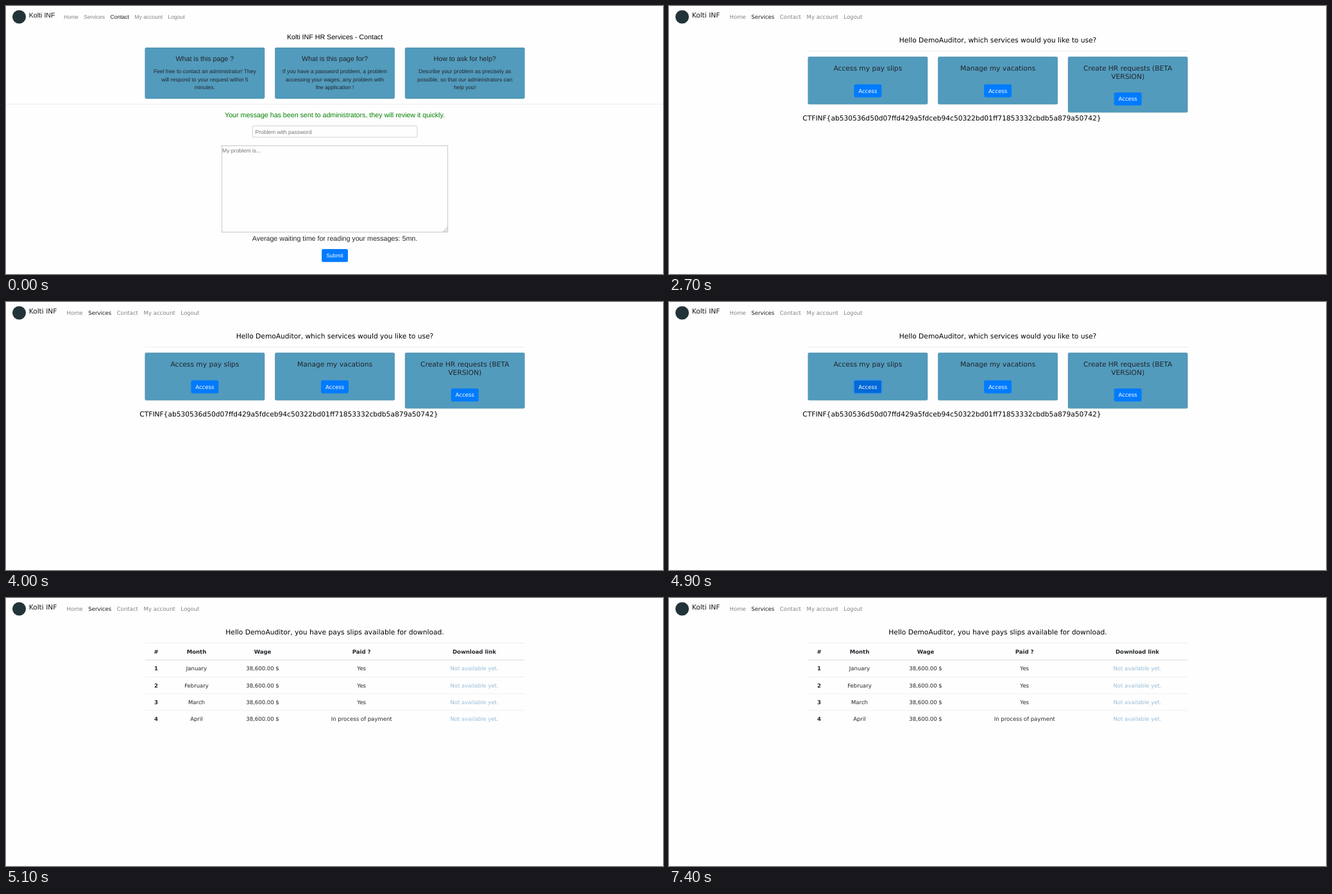
These frames come from a looping animation (1024x419 px, 8000 ms). An HTML page:

```html
<!DOCTYPE html>
<html lang="en">
<head>
<meta charset="utf-8">
<title>HR services</title>
<style>
  html, body { margin: 0; width: 100%; height: 100%; overflow: hidden; background: #fefefe; }
  svg { display: block; width: 100vw; height: 100vh; text-rendering: geometricPrecision; }
  .sans { font-family: "Liberation Sans", Arial, sans-serif; }
  .wide { font-family: "DejaVu Sans", sans-serif; }
</style>
</head>
<body>
<svg id="stage" viewBox="0 0 1024 419"></svg>
<script>
const LOOP = 8000;
const BIG = 10.667, SMALL = 8.533, HAIR = 0.533;
const MID = 512.5, PITCH = 202.67, CARD_W = 186.67;
const LEFT = MID - 296, RIGHT = MID + 296;
const INK = '#212529', BLUE = '#007bff', BLUE_HOVER = '#0069d9', BLUE_DOWN = '#0062cc';
const GREY = '#808080', HOVER = '#4d4d4d', ACTIVE = '#1a1a1a';
const BRAND = 'Kolti INF', USER = 'DemoAuditor';
const LINKS = ['Home', 'Services', 'Contact', 'My account', 'Logout'];

const stage = document.getElementById('stage');

function add(parent, tag, attrs, text) {
  const el = document.createElementNS('http://www.w3.org/2000/svg', tag);
  for (const key in attrs) el.setAttribute(key, attrs[key]);
  if (text) el.textContent = text;
  parent.appendChild(el);
  return el;
}

function label(parent, text, x, y, size = SMALL, fill = INK, more = {}) {
  return add(parent, 'text', { x, y, 'font-size': size, fill, ...more }, text);
}

function centred(parent, text, x, y, size, fill, more = {}) {
  return label(parent, text, x, y, size, fill, { 'text-anchor': 'middle', ...more });
}

function box(parent, x, y, width, height, fill, stroke = 'none', rx = 2.13) {
  return add(parent, 'rect', { x, y, width, height, fill, stroke, rx, 'stroke-width': HAIR });
}

function rule(parent, x1, x2, y, stroke = '#dee2e6', width = HAIR) {
  return add(parent, 'line', { x1, x2, y1: y, y2: y, stroke, 'stroke-width': width });
}

function page(font, linkXs, active) {
  const g = add(stage, 'g', { class: font });
  add(g, 'circle', { cx: 20.5, cy: 17, r: 10.5, fill: '#22333a' });
  label(g, BRAND, 35.7, 18.4, BIG, ACTIVE);
  const links = LINKS.map((name, i) =>
    label(g, name, linkXs[i], 20.2, SMALL, name === active ? ACTIVE : GREY));
  return { g, links };
}

function card(parent, i, y, height, titles) {
  const x = MID + (i - 1) * PITCH, left = x - CARD_W / 2, inset = HAIR / 2;
  box(parent, left, y, CARD_W, height, '#529bbd');
  box(parent, left + inset, y + inset, CARD_W - HAIR, height - HAIR, 'none', 'rgba(0,0,0,.125)', 1.9);
  titles.forEach((t, n) => centred(parent, t, x, y + 21.4 + n * 12.8, BIG));
  return x;
}

function button(parent, text, x, y, width) {
  const face = box(parent, x - width / 2, y, width, 20.27, BLUE);
  centred(parent, text, x, y + 13.2, SMALL, '#fff');
  return face;
}

function buildContact() {
  const p = page('sans', [90, 121.3, 162.6, 200.5, 252.6], 'Contact'), g = p.g;
  centred(g, BRAND + ' HR Services - Contact', MID, 51.8, BIG, '#000');
  const cards = [
    ['What is this page ?', 'Feel free to contact an administrator! They',
      'will respond to your request within 5', 'minutes.'],
    ['What is this page for?', 'If you have a password problem, a problem',
      'accessing your wages, any problem with', 'the application !'],
    ['How to ask for help?', 'Describe your problem as precisely as',
      'possible, so that our administrators can', 'help you!']
  ];
  cards.forEach(([title, ...lines], i) => {
    const x = card(g, i, 64.9, 80, [title]);
    lines.forEach((line, n) => centred(g, line, x, 104.7 + n * 12.8));
  });
  rule(g, 0, 1024, 153.5, '#dfdfdf');

  centred(g, 'Your message has been sent to administrators, they will review it quickly.',
    MID, 174.2, BIG, '#008000');
  box(g, 384.3, 187.4, 256.6, 17.7, '#fefefe', '#a9a9a9');
  label(g, 'Problem with password', 388.4, 199.6, SMALL, '#757575');
  box(g, 336.5, 218.5, 352, 134.9, '#fefefe', '#9a9a9a', 0);
  label(g, 'My problem is...', 337.1, 228.5, SMALL, '#757575');
  for (const d of [7, 4.6, 2.2])
    add(g, 'line', { x1: 688 - d, y1: 353, x2: 688, y2: 353 - d, stroke: '#777', 'stroke-width': HAIR });
  centred(g, 'Average waiting time for reading your messages: 5mn.', MID, 367.2, BIG);
  button(g, 'Submit', MID, 380, 40.8);
  return p;
}

const WIDE_XS = [94.6, 128.3, 172.8, 214.6, 272.3];

function buildServices() {
  const p = page('wide', WIDE_XS, 'Services'), g = p.g;
  centred(g, `Hello ${USER}, which services would you like to use?`, MID, 57.3, BIG, '#000');
  rule(g, LEFT, RIGHT, 70.5, '#dfdfdf');
  const cards = [
    ['Access my pay slips'],
    ['Manage my vacations'],
    ['Create HR requests (BETA', 'VERSION)']
  ];
  const faces = cards.map((titles, i) => {
    const extra = (titles.length - 1) * 12.8;
    const x = card(g, i, 79.3, 74.5 + extra, titles);
    if (i === 0) {
      p.ring = add(g, 'rect', { x: x - 22.4, y: 121.6, width: 44.8, height: 21.8, rx: 2.8,
        fill: 'none', stroke: '#268fff', 'stroke-width': 1.6 });
    }
    return button(g, 'Access', x, 122.4 + extra, 42.9);
  });
  p.face = faces[0];
  p.dots = add(g, 'rect', { x: MID - PITCH - 21.4, y: 122.4, width: 42.8, height: 20.2, rx: 1,
    fill: 'none', stroke: '#7db4e8', 'stroke-width': HAIR, 'stroke-dasharray': '1 1' });
  label(g, 'CTFINF{ab530536d50d07ffd429a5fdceb94c50322bd01ff71853332cbdb5a879a50742}',
    208.3, 178.5, BIG, '#000');
  return p;
}

function buildSlips() {
  const p = page('wide', WIDE_XS, 'Services'), g = p.g;
  const columns = [234, 297, 400, 554.2, 730];
  const bold = { 'font-weight': 'bold' };
  centred(g, `Hello ${USER}, you have pays slips available for download.`, MID, 57.3, BIG, '#000');
  rule(g, LEFT, RIGHT, 70.5);
  rule(g, LEFT, RIGHT, 96.9, '#dee2e6', 2 * HAIR);
  ['#', 'Month', 'Wage', 'Paid ?', 'Download link'].forEach((t, c) =>
    centred(g, t, columns[c], 86.9, SMALL, INK, bold));
  ['January', 'February', 'March', 'April'].forEach((month, r) => {
    const y = 113.4 + r * 26.13;
    const paid = r < 3 ? 'Yes' : 'In process of payment';
    if (r) rule(g, LEFT, RIGHT, y - 16.1);
    [String(r + 1), month, '38,600.00 $', paid, 'Not available yet.'].forEach((t, c) =>
      centred(g, t, columns[c], y, SMALL, c === 4 ? '#93bbd9' : INK, c ? {} : bold));
  });
  return p;
}

const pages = { contact: buildContact(), services: buildServices(), slips: buildSlips() };

// Each step starts at its time: page, hovered link, button colour, focus ring strength.
const steps = [
  { at: 0, page: 'contact' },
  { at: 1300, page: 'contact', link: 'Services' },
  { at: 2700, page: 'services' },
  { at: 4000, page: 'services', face: '#007afc' },
  { at: 4100, page: 'services', face: '#006fe6' },
  { at: 4200, page: 'services', face: BLUE_HOVER },
  { at: 4700, page: 'services', face: '#0066d3', ring: 0.2 },
  { at: 4800, page: 'services', face: BLUE_DOWN, ring: 0.4 },
  { at: 4900, page: 'services', face: BLUE_HOVER, ring: 0.5 },
  { at: 5100, page: 'slips' },
  { at: 7200, page: 'slips', link: 'My account' },
  { at: 7300, page: 'slips', link: 'Contact' },
  { at: 7400, page: 'slips' }
];

let shown;
function show(step) {
  for (const name in pages)
    pages[name].g.style.display = name === step.page ? '' : 'none';
  const active = step.page === 'contact' ? 'Contact' : 'Services';
  pages[step.page].links.forEach((el, i) => {
    const name = LINKS[i];
    el.setAttribute('fill', name === active ? ACTIVE : name === step.link ? HOVER : GREY);
  });
  const { face, ring, dots } = pages.services;
  face.setAttribute('fill', step.face || BLUE);
  ring.setAttribute('opacity', step.ring || 0);
  dots.setAttribute('opacity', step.ring ? 1 : 0);
}

const start = performance.now();
function tick() {
  const t = (performance.now() - start) % LOOP;
  const step = steps.filter(s => s.at <= t).pop();
  if (step !== shown) show(shown = step);
  requestAnimationFrame(tick);
}
tick();
</script>
</body>
</html>
```
